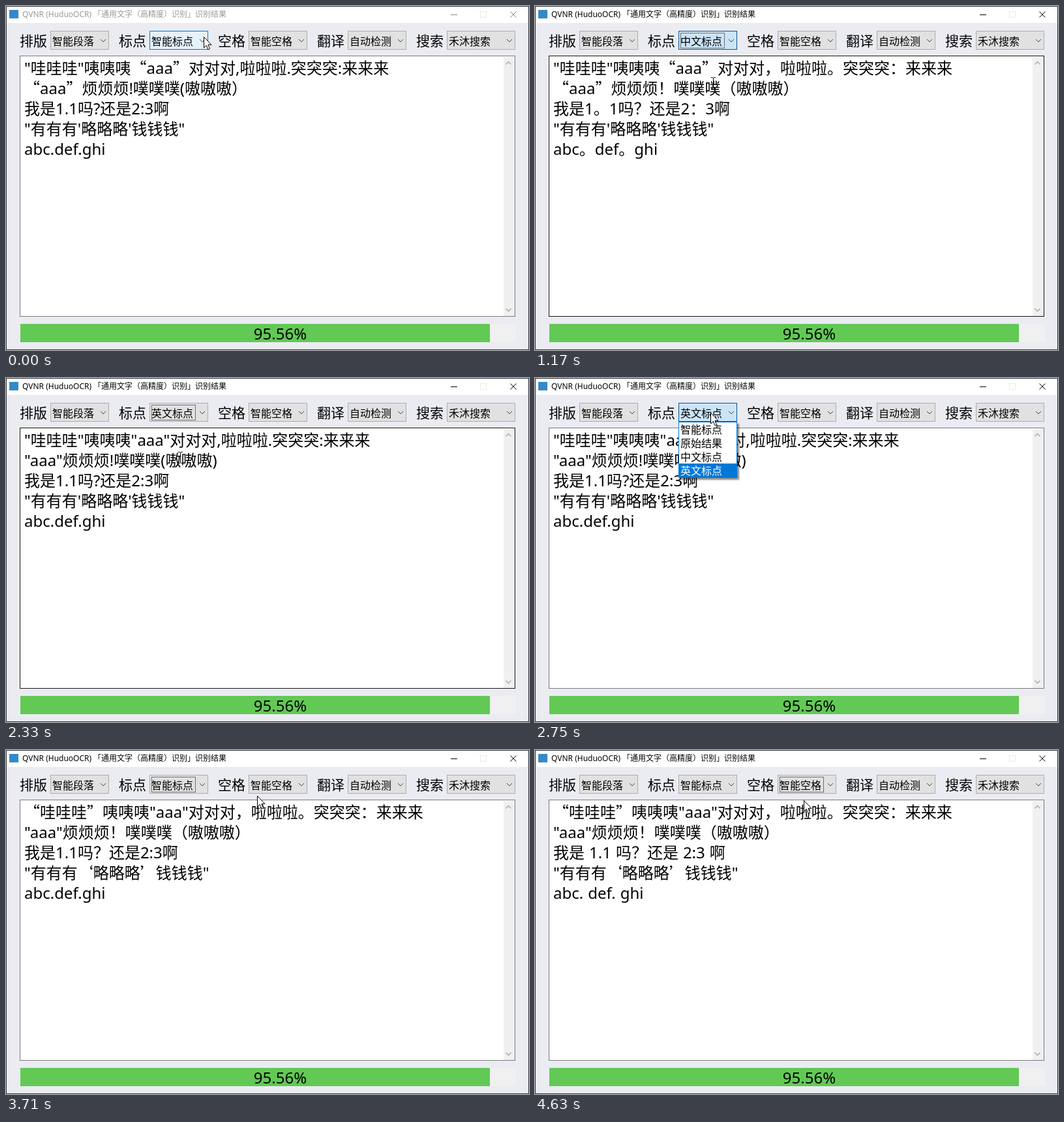
An HTML page that plays this animation: 802x527 px, repeating every 5140 ms.

```html
<!DOCTYPE html>
<html lang="zh-CN">
<head>
<meta charset="utf-8">
<style>
html, body { margin: 0; width: 100%; height: 100%; overflow: hidden; background: #ebecf2; }
svg { display: block; width: 802px; height: 527px; }
text { font-family: "Noto Sans", "Noto Sans CJK SC", "Noto Sans CJK", sans-serif; text-spacing-trim: space-all; white-space: pre; }
.wide { font-family: "Noto Sans CJK SC", "Noto Sans CJK", sans-serif; }
</style>
</head>
<body>
<svg id="stage" viewBox="0 0 802 527" xmlns="http://www.w3.org/2000/svg"></svg>
<script>
const LOOP = 5140;
const BLUE = '#0078d7';
const stage = document.getElementById('stage');

const text = (x, y, size, str, extra = '') =>
  `<text x="${x}" y="${y}" font-size="${size}" ${extra}>` +
  str.replace(/[“”‘’]/g, '<tspan class="wide">$&</tspan>') + '</text>';
const rect = (x, y, w, h, fill, extra = '') =>
  `<rect x="${x}" y="${y}" width="${w}" height="${h}" fill="${fill}" ${extra}/>`;
// One-pixel outline covering whole pixels x..x+w, y..y+h.
const box = (x, y, w, h, fill, stroke, extra = '') =>
  rect(x + .5, y + .5, w - 1, h - 1, fill, `stroke="${stroke}" ${extra}`);
const line = (d, stroke, extra = '') => `<path d="${d}" fill="none" stroke="${stroke}" ${extra}/>`;

const PUNCT = ['智能标点', '原始结果', '中文标点', '英文标点'];
const SPACE = ['智能空格', '原始结果', '去除空格'];
const combos = [
  ['排版', '智能段落', 21, 90], ['标点', '智能标点', 173, 90], ['空格', '智能空格', 325, 90],
  ['翻译', '自动检测', 477, 90], ['搜索', '禾沐搜索', 629, 105]
];

// Recognised text after each choice, with the time it appears.
const texts = [
  [0, '"哇哇哇"咦咦咦“aaa”对对对,啦啦啦.突突突:来来来', '“aaa”烦烦烦!噗噗噗(嗷嗷嗷）',
    '我是1.1吗?还是2:3啊', `"有有有'略略略'钱钱钱"`, 'abc.def.ghi'],
  [1170, '"哇哇哇"咦咦咦“aaa”对对对，啦啦啦。突突突：来来来', '“aaa”烦烦烦！噗噗噗（嗷嗷嗷）',
    '我是1。1吗？还是2：3啊', `"有有有'略略略'钱钱钱"`, 'abc。def。ghi'],
  [2060, '"哇哇哇"咦咦咦"aaa"对对对,啦啦啦.突突突:来来来', '"aaa"烦烦烦!噗噗噗(嗷嗷嗷)',
    '我是1.1吗?还是2:3啊', `"有有有'略略略'钱钱钱"`, 'abc.def.ghi'],
  [3230, '“哇哇哇”咦咦咦"aaa"对对对，啦啦啦。突突突：来来来', '"aaa"烦烦烦！噗噗噗（嗷嗷嗷）',
    '我是1.1吗？还是2:3啊', '"有有有‘略略略’钱钱钱"', 'abc.def.ghi'],
  [4460, '“哇哇哇”咦咦咦"aaa"对对对，啦啦啦。突突突：来来来', '"aaa"烦烦烦！噗噗噗（嗷嗷嗷）',
    '我是 1.1 吗？还是 2:3 啊', '"有有有‘略略略’钱钱钱"', 'abc. def. ghi']
];
const choice = [0, 2, 3, 0, 0];

// Combo box states over time.
const states = {
  1: [[0, 'hover'], [560, 'open'], [1170, 'normal'], [1370, 'hover'], [1470, 'open'],
      [2060, 'normal'], [2480, 'hover'], [2580, 'open'], [3230, 'normal']],
  2: [[0, 'normal'], [3770, 'hover'], [3850, 'open'], [4460, 'normal']]
};
const look = {
  normal: { fill: [225, 225, 225], edge: [173, 173, 173] },
  hover: { fill: [229, 241, 251], edge: [0, 120, 215] },
  open: { fill: [204, 228, 247], edge: [0, 84, 153] }
};

// Pointer path: time, x, y.
const path = [
  [0, 303, 47], [69.9, 303, 47], [70, 300, 47], [309.9, 300, 47], [310, 299, 49], [560, 299, 49],
  [790, 286, 77], [1060, 273, 118], [1170, 273, 118], [1420, 266, 53], [1720, 265, 53],
  [1880, 264, 121], [2000, 266, 143], [2260, 266, 143], [2560, 269, 53], [2930, 269, 53],
  [3130, 268, 84], [3600, 268, 84], [3710, 385, 70], [3800, 416, 55], [4180, 416, 55],
  [4260, 412, 77], [LOOP, 412, 77]
];

const last = (list, t) => {
  let i = list.length - 1;
  while (i > 0 && list[i][0] > t) i--;
  return i;
};

function pointer(t) {
  const i = Math.min(last(path, t), path.length - 2);
  const [a, x, y] = path[i], [b, u, v] = path[i + 1];
  const k = (t - a) / (b - a);
  return [Math.round(x + (u - x) * k), Math.round(y + (v - y) * k)];
}

const rgb = (a, b, k) => `rgb(${a.map((v, i) => Math.round(v + (b[i] - v) * k))})`;

function paint(id, t) {
  const list = states[id], i = last(list, t), now = look[list[i][1]];
  const before = i ? look[list[i - 1][1]] : now;
  const k = list[i][1] === 'open' ? 1 : Math.min(1, (t - list[i][0]) / 170);
  const el = document.getElementById('combo' + id);
  el.setAttribute('fill', rgb(before.fill, now.fill, k));
  el.setAttribute('stroke', rgb(before.edge, now.edge, k));
  return list[i][1] === 'open';
}

function menu(x, items, hot, dotted) {
  const h = items.length * 21 + 2;
  return rect(x + 3, 70, 90, h, '#000', 'opacity=".45" filter="url(#soft)"') +
    box(x, 67, 90, h, '#fff', BLUE) +
    items.map((s, i) => {
      const y = 68 + i * 21, on = i === hot;
      return (on ? rect(x + 1, y, 88, 21, BLUE) : '') +
        (on && dotted ? box(x + 1, y, 88, 21, 'none', '#ff8728', 'stroke-dasharray="1 1"') : '') +
        text(x + 3, y + 17, 16, s, on ? 'fill="#fff"' : '');
    }).join('');
}

function build() {
  let s = `<defs><filter id="soft"><feGaussianBlur stdDeviation="1"/></filter></defs>` +
    rect(0, 0, 802, 527, '#ebecf2') + rect(0, 0, 802, 26, '#fff') +
    box(0, 0, 802, 527, 'none', '#34343c') +
    rect(5, 6, 14, 13, '#3689c6') +
    '<g id="title">' + text(25, 17, 12, 'QVNR (HuduoOCR)') +
    text(134, 17, 12, '「通用文字（高精度）识别」识别结果') + '</g>' +
    '<g id="buttons">' + line('M682 13.5H692M773.5 8.5l9 9M782.5 8.5l-9 9', 'currentColor') + '</g>' +
    box(727, 8, 10, 10, 'none', '#efe9dc');
  combos.forEach(([label, value, x, w], i) => {
    const left = x + 47, tip = left + w - 9;
    s += text(x, 61, 21, label) +
      box(left, 38, w, 29, '#e1e1e1', '#adadad', `id="combo${i}"`) +
      text(left + 3, 60, 16, value, `id="value${i}"`) +
      line(`M${tip - 4} 51l4 4 4 -4`, '#444') +
      box(left + 3, 41, 68, 24, 'none', '#000', `id="focus${i}" stroke-dasharray="1 1" visibility="hidden"`);
  });
  s += box(21, 76, 760, 400, '#fff', '#7a7a7a', 'id="area"') +
    rect(763, 78, 17, 397, '#f0f0f0') +
    line('M766.5 89.5l4 -4 4 4M766.5 463.5l4 4 4 -4', '#b0b0b0', 'stroke-width="1.6"') +
    '<g id="result" style="word-spacing:.76px"></g>' +
    rect(22, 487, 760, 28, '#f0f0f0') + rect(22, 487, 720, 28, '#62c955') +
    text(420.5, 511, 24, '95.56%', 'text-anchor="middle"') +
    '<g id="list"></g>' +
    '<path id="arrow" d="M.5 .5V17L4.3 13.4 7 19.8 9.6 18.7 6.9 12.4H12Z" fill="#fff" stroke="#000"/>' +
    '<path id="beam" d="M-3 -8.5H-1L.5 -7.5 2 -8.5H4M.5 -7.5V7.5M-3 8.5H-1L.5 7.5 2 8.5H4" fill="none" stroke="#000"/>';
  stage.innerHTML = s;
}

const $ = id => document.getElementById(id);
const show = (id, on) => $(id).setAttribute('visibility', on ? 'visible' : 'hidden');
let shownText = -1, shownList = '';

function draw(t) {
  const step = last(texts, t), [x, y] = pointer(t), active = t >= 560;
  $('title').setAttribute('fill', active ? '#000' : '#999');
  $('buttons').setAttribute('color', active ? '#000' : '#888');
  if (step !== shownText) {
    shownText = step;
    $('result').innerHTML = texts[step].slice(1).map((s, i) => text(28, 104 + i * 31, 24, s)).join('');
    $('value1').textContent = PUNCT[choice[step]];
  }
  const open1 = paint(1, t), open2 = paint(2, t);
  show('focus1', t >= 1170 && t < 3850 && !open1);
  show('focus2', t >= 4460);

  const over = Math.floor((y - 68) / 21);
  const hot = over >= 0 ? over : open1 ? choice[step] : 0;
  const list = open1 ? menu(220, PUNCT, hot, step === 1) : open2 ? menu(372, SPACE, hot) : '';
  if (list !== shownList) $('list').innerHTML = shownList = list;

  const inside = y > 77 && !list;
  $('area').setAttribute('stroke', inside ? '#171717' : '#7a7a7a');
  show('arrow', !inside);
  show('beam', inside);
  for (const id of ['arrow', 'beam']) $(id).setAttribute('transform', `translate(${x} ${y})`);
}

build();
const start = performance.now();
function tick() {
  draw((performance.now() - start) % LOOP);
  requestAnimationFrame(tick);
}
draw(0);
requestAnimationFrame(tick);
</script>
</body>
</html>
```
